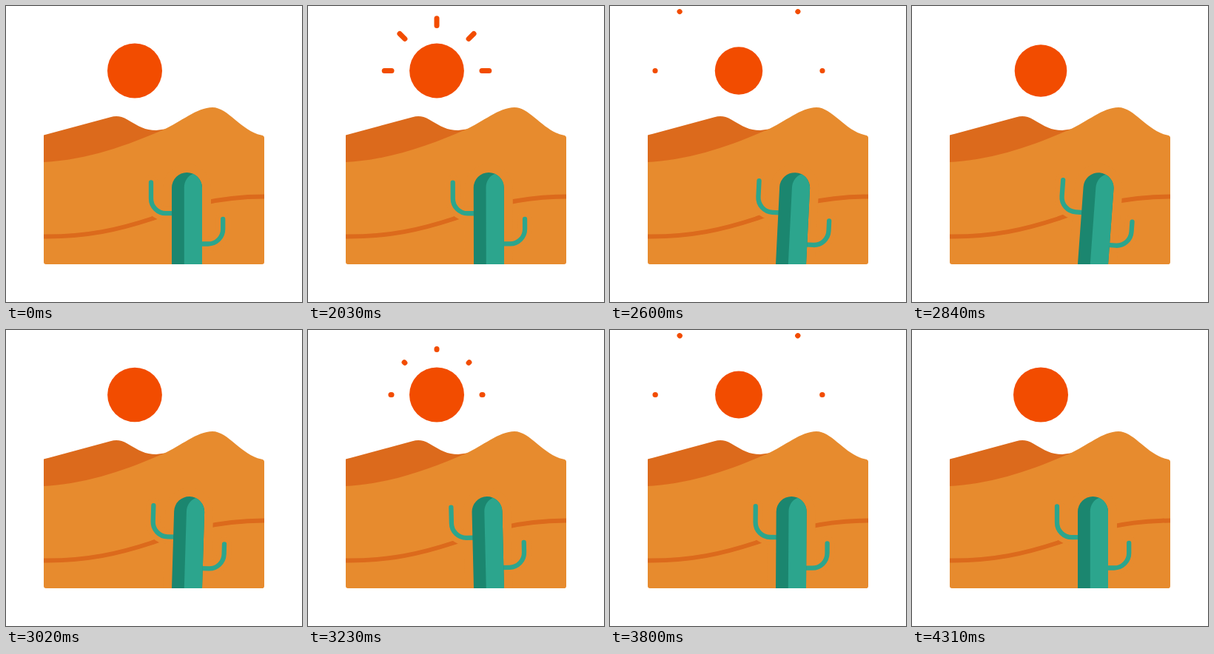
These frames come from a looping animation (400 px wide and 400 px high, 4.34 s). An HTML page:

```html
<!DOCTYPE html>
<html lang="en">
<head>
<meta charset="utf-8">
<title>Desert sun</title>
<style>
  html, body { margin: 0; width: 100%; height: 100%; overflow: hidden; background: #fff; }
  svg { display: block; width: 100vw; height: 100vh; }
  .line { fill: none; stroke-linecap: round; }
  .sun { fill: #f24c00; }
  .ray { stroke: #f24c00; stroke-width: 7; }
  .dune { fill: #e78b2e; }
  .shade { fill: #dc6a1c; }
  .ridge { stroke: #dc6a1c; stroke-width: 6; stroke-linecap: butt; }
  .gap { fill: #e78b2e; stroke: #e78b2e; }
  .arm { stroke: #2ca58d; stroke-width: 6.3; }
  .trunk { fill: #1b866f; }
  .light { fill: #2ca58d; }
</style>
</head>
<body>
<svg viewBox="0 0 400 400" xmlns="http://www.w3.org/2000/svg">
  <defs>
    <clipPath id="ground"><rect x="51" y="100" width="298" height="249" rx="3"/></clipPath>
    <path id="trunk" d="M224 360V245.5A20.5 20.5 0 0 1 265 245.5V360Z"/>
    <path id="arms" d="M196 238.5V260A20 20 0 0 0 216 280.2H226M293.2 288V301.5A20 20 0 0 1 273.2 321.5H262"/>
  </defs>

  <g id="rays"></g>
  <circle id="sun" class="sun" cx="174" cy="87.5" r="37"/>

  <g clip-path="url(#ground)">
    <path class="shade" d="M51 174.5L141 150.2Q153 147 163 153C180 163 188 168 203 168L225 165V215H51Z"/>
    <path class="dune" d="M51 211C110 208 165 188 213 167C236 157 258 137 279 137C300 137 318 169 345 174.5Q349 175 349 178V349H51Z"/>
    <path class="line ridge" d="M48 311.5H51C110 312 153 302 197 287.5C235 274 280 257.5 349 257.5"/>
    <g id="cactus">
      <use href="#trunk" class="gap" stroke-width="24"/>
      <use href="#arms" class="line gap" style="fill:none" stroke-width="20"/>
      <use href="#arms" class="line arm"/>
      <use href="#trunk" class="trunk"/>
      <path class="light" d="M240.8 360V245.5C240.8 237 245.5 229.5 253 226.8A20.5 20.5 0 0 1 265 245.5V360Z"/>
    </g>
  </g>
</svg>
<script>
  const LOOP = 4340, REST = 2000, STEP = 30;
  const SECOND = 40.9;            // step at which the second pulse begins
  const INNER = 61, OUTER = 113;  // ray radii
  const SWAY = [[0, 0], [10, -5.1], [24, 4.8], [46, -2.3], [62, 0.5], [77, 0]];
  const PULSE = [[0, 37], [12.5, 30.7], [36, 37]];

  const $ = id => document.getElementById(id);
  const clamp = x => Math.min(1, Math.max(0, x));
  const smooth = x => x * x * (3 - 2 * x);
  const easeOut = step => 1 - Math.pow(1 - clamp(step / 13), 2.6);

  function sample(keys, s) {
    for (let k = 1; k < keys.length; k++) {
      const [s0, v0] = keys[k - 1], [s1, v1] = keys[k];
      if (s <= s1) return v0 + (v1 - v0) * smooth(clamp((s - s0) / (s1 - s0)));
    }
    return keys[keys.length - 1][1];
  }

  const rays = [0, 45, 90, 135, 180].map(deg => {
    const line = document.createElementNS("http://www.w3.org/2000/svg", "line");
    line.setAttribute("class", "line ray");
    line.setAttribute("transform", `translate(174 87.5) rotate(${-deg})`);
    return $("rays").appendChild(line);
  });

  function draw(time) {
    const t = time % LOOP;
    const step = Math.max(0, Math.floor((t - REST) / STEP));
    const pulse = step < SECOND ? step : step - SECOND;
    const head = easeOut(pulse), tail = easeOut(pulse - 8);

    $("rays").setAttribute("visibility", head > 0 && tail < 1 ? "visible" : "hidden");
    for (const ray of rays) {
      ray.setAttribute("x1", INNER + (OUTER - INNER) * tail);
      ray.setAttribute("x2", INNER + (OUTER - INNER) * head + 0.01);
    }
    $("sun").setAttribute("r", sample(PULSE, pulse));
    $("cactus").setAttribute("transform", `rotate(${sample(SWAY, step)} 244.5 349)`);
  }

  const start = performance.now();
  function tick() {
    draw(performance.now() - start);
    requestAnimationFrame(tick);
  }
  tick();
</script>
</body>
</html>
```
